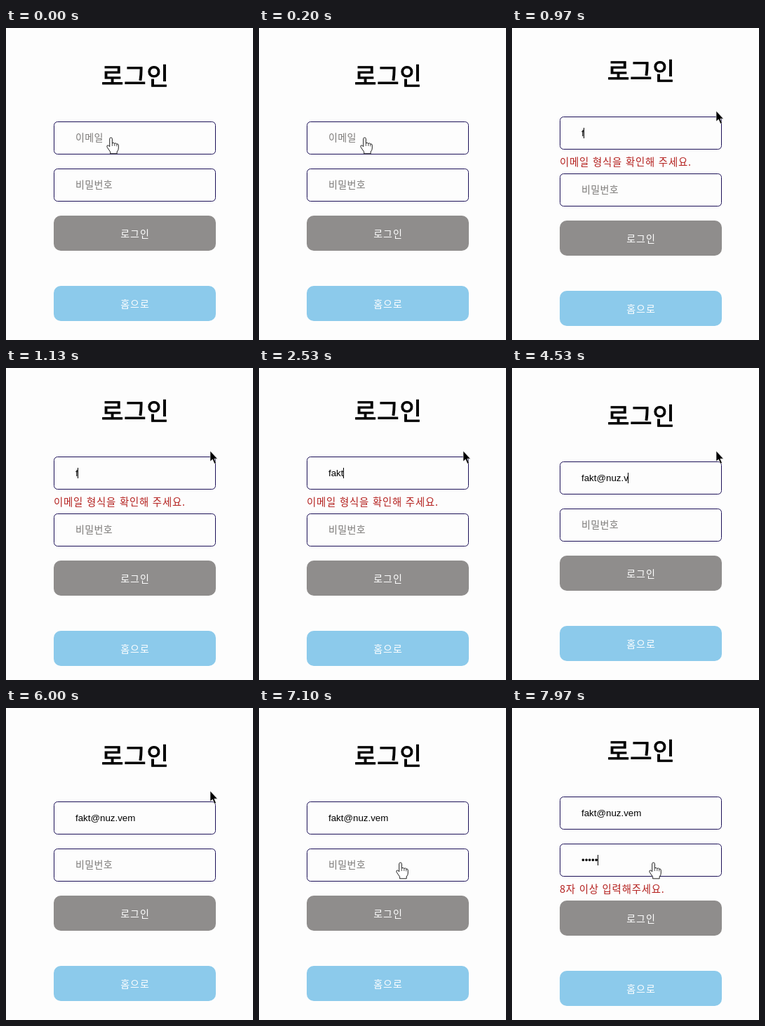
These frames come from a looping animation (352 px wide and 444 px high, 8000 ms). An HTML page:

```html
<!DOCTYPE html>
<html lang="ko">
<head>
<meta charset="utf-8">
<style>
  html, body { margin: 0; width: 100%; height: 100%; overflow: hidden; background: #fdfdfd; }
  svg { display: block; width: 352px; height: 444px; }
  text { font-family: "Noto Sans CJK KR", "Noto Sans CJK", sans-serif; font-size: 14px; }
  .title { font-size: 34px; letter-spacing: 1px; stroke: #000; stroke-width: 1.1px; }
  .field { fill: #fdfdfd; stroke: #1c1158; }
  .hint { fill: #7c7a78; letter-spacing: .4px; }
  .value { font-family: "Liberation Sans", Arial, sans-serif; font-size: 13.333px; }
  .label { fill: #fff; letter-spacing: .9px; text-anchor: middle; }
  .error { fill: #b4201e; font-size: 14.4px; letter-spacing: .8px; }
</style>
</head>
<body>
<svg viewBox="0 0 352 444">
  <rect width="352" height="444" fill="#fdfdfd"/>
  <g id="top">
    <text class="title" x="136" y="80.5">로그인</text>
    <rect class="field" x="68.5" y="133.5" width="230" height="46" rx="5"/>
    <text id="mailHint" class="hint" x="99" y="161">이메일</text>
    <text id="mail" class="value" x="99" y="161"></text>
    <rect id="mailCaret" y="149" width="1" height="15"/>
  </g>
  <text id="mailError" class="error" x="68" y="196">이메일 형식을 확인해 주세요.</text>
  <g id="middle">
    <rect class="field" x="68.5" y="200.5" width="230" height="46" rx="5"/>
    <text id="passHint" class="hint" x="99" y="228">비밀번호</text>
    <text id="pass" class="value" x="99" y="228"></text>
    <rect id="passCaret" y="216" width="1" height="15"/>
  </g>
  <text id="passError" class="error" x="68" y="263">8자 이상 입력해주세요.</text>
  <g id="bottom">
    <rect x="68" y="267" width="231" height="50" rx="10" fill="#8f8d8c"/>
    <text class="label" x="184" y="298">로그인</text>
    <rect x="68" y="367" width="231" height="50" rx="10" fill="#8ccaeb"/>
    <text class="label" x="184" y="398">홈으로</text>
  </g>
  <path id="arrow" d="M0 0V15L3.4 12L6 18.3L8.4 17.3L5.8 11.2H10.4Z" stroke="#fff" stroke-width=".6"/>
  <g id="hand" fill="#fff" stroke="#222" stroke-linejoin="round">
    <path d="M-1.3 12V.8Q-1.3 -1 .6 -1Q2.4 -1 2.4 .8V7Q4.2 5.4 5.8 7.4Q7.6 6.1 8.8 8Q11.3 7.4 11.3 10V14Q11.3 17 9.2 19V21.8H-.4V19.2L-4.9 12.6Q-5.8 10 -3.7 9.9Q-2.6 10 -1.3 12Z"/>
    <path d="M2.4 7V11M5.8 7.4V11M8.8 8V11.4" fill="none" stroke-width=".8"/>
  </g>
</svg>
<script>
const LOOP = 8000, SHIFT = 7, TEXT_X = 99;
const ADDRESS = "fakt@nuz.vem";
const mailKeys = [930, 1200, 1430, 1670, 3300, 3870, 3930, 4000, 4130, 4430, 5470, 5600];
const passKeys = [7370, 7430, 7700, 7700, 7930];

// Pointer moves: start and end time, then the hot spot reached.
const home = [149, 157];
const moves = [
  [200, 430, 291, 118],
  [6390, 6700, 208, 223],
  [6860, 6870, 201, 221]
];

const el = id => document.getElementById(id);
const show = (id, on) => el(id).setAttribute("visibility", on ? "visible" : "hidden");
const move = (id, x, y) => el(id).setAttribute("transform", `translate(${x} ${y})`);
const within = (t, a, b) => t >= a && t < b;
const typed = (keys, t) => keys.filter(k => t >= k).length;
const easeOut = p => p * (2 - p);

function pointerAt(t) {
  let [x, y] = home;
  for (const [from, to, toX, toY] of moves) {
    const p = easeOut(Math.min(1, Math.max(0, (t - from) / (to - from))));
    x += (toX - x) * p;
    y += (toY - y) * p;
  }
  return [Math.round(x), Math.round(y)];
}

function setField(name, value, caretOn) {
  const node = el(name);
  node.textContent = value;
  show(name + "Hint", !value);
  const width = value ? node.getComputedTextLength() : 0;
  el(name + "Caret").setAttribute("x", Math.floor(TEXT_X + width));
  show(name + "Caret", caretOn);
}

function draw(t) {
  const badMail = within(t, 930, 4430);
  const badPass = t >= 7370;
  const up = badMail || badPass ? -SHIFT : 0;
  move("top", 0, up);
  move("middle", 0, badMail ? SHIFT : up);
  move("bottom", 0, -up);
  show("mailError", badMail);
  show("passError", badPass);

  const mailCaret = within(t, 930, 6000) && !within(t, 2230, 2530) && !within(t, 3000, 3300);
  setField("mail", ADDRESS.slice(0, typed(mailKeys, t)), mailCaret);
  setField("pass", "•".repeat(typed(passKeys, t)), within(t, 6700, 7100) || badPass);

  const [x, y] = pointerAt(t);
  const over = within(x, 68, 299) && (within(y, 133, 180) || within(y, 200, 247));
  show("hand", over);
  show("arrow", !over);
  move("hand", x, y);
  move("arrow", x, y);
}

const start = performance.now();
function tick(now) {
  draw(Math.max(0, now - start) % LOOP);
  requestAnimationFrame(tick);
}
draw(0);
requestAnimationFrame(tick);
</script>
</body>
</html>
```
